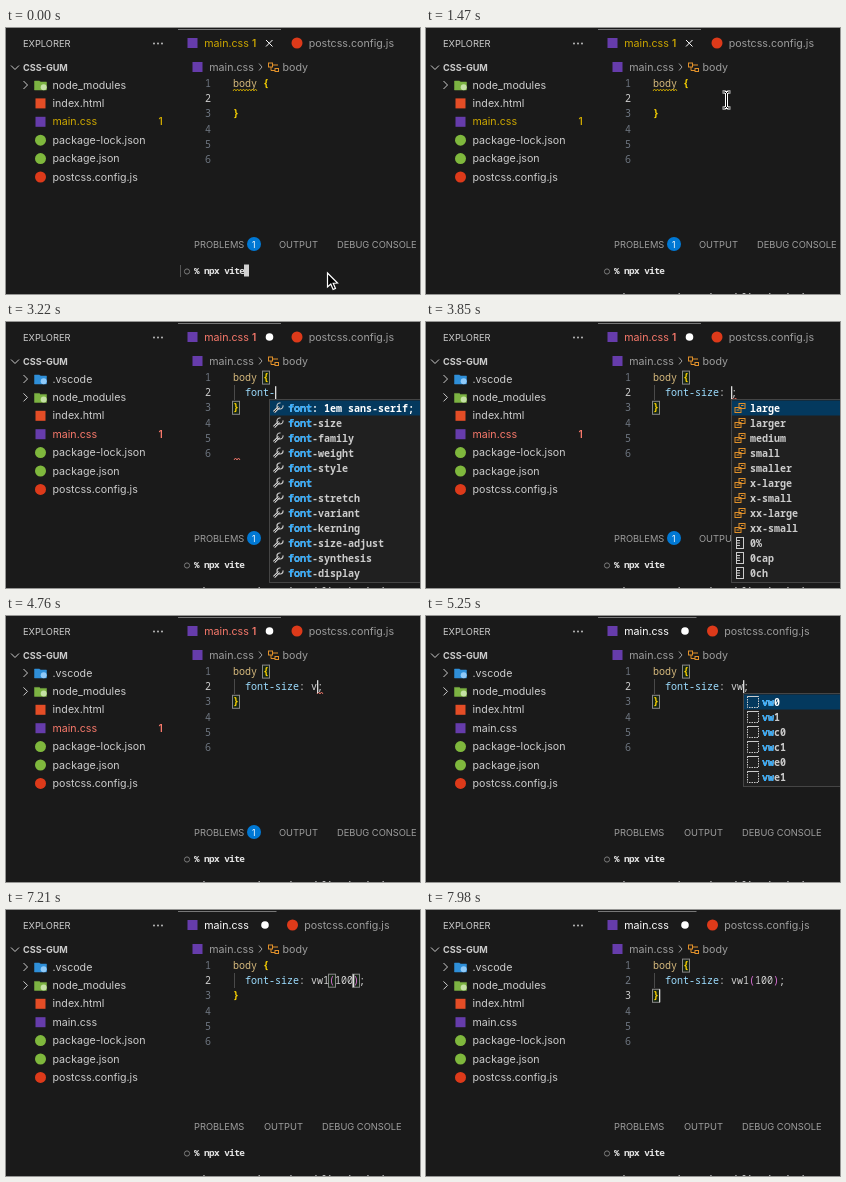
An HTML page with a canvas for the animation above (8000 ms loop, 414 px wide and 266 px high).

```html
<!DOCTYPE html>
<html lang="en">
<head>
<meta charset="utf-8">
<title>Editor typing demo</title>
<style>
html, body { margin: 0; width: 100%; height: 100%; overflow: hidden; background: #1a1a1a; }
canvas { display: block; width: 414px; height: 266px; }
</style>
</head>
<body>
<canvas id="stage"></canvas>
<script>
const W = 414, H = 266, LOOP = 8000;
const canvas = document.getElementById('stage');
const ctx = canvas.getContext('2d');
const dpr = window.devicePixelRatio || 1;
canvas.width = W * dpr;
canvas.height = H * dpr;

const UI = '10.65px Inter, sans-serif';
const CAPS = '9.3px Inter, sans-serif';
const COUNT = '600 10px Inter, sans-serif';
const CODE = '500 10px "Noto Sans Mono", monospace';
const BOLD = '600 10px "Noto Sans Mono", monospace';
const SHELL = '600 9.4px "Noto Sans Mono", monospace';
const CH = 6, LEFT = 227, INDENT = 239;
const C = {
  back: '#1a1a1a', text: '#cccccc', dim: '#9d9d9d', warn: '#cca700', error: '#f8796b',
  css: '#663cab', red: '#dd3a1a', green: '#7fb83d', orange: '#e0902a', gold: '#ffd700', pink: '#da70d6'
};

const PROPS = ['font: 1em sans-serif;', 'font-size', 'font-family', 'font-weight', 'font-style', 'float',
  'flex-direction', 'flex-wrap', 'flex', 'font', 'fill', 'flex-grow', 'font-stretch', 'font-variant',
  'font-kerning', 'font-size-adjust', 'font-synthesis', 'font-display', 'font-palette'];
const VALUES = ['large', 'larger', 'medium', 'small', 'smaller', 'x-large', 'x-small', 'xx-large',
  'xx-small', '0%', '0cap', '0ch'];
const SNIPPETS = ['vw0', 'vw1', 'vwc0', 'vwc1', 'vwe0', 'vwe1'];

// time, text of line 2, caret column, suggestion list, typed prefix
const KEYS = [
  [1820, '', 0],
  [2380, 'f', 1, PROPS, 'f'],
  [2730, 'fo', 2, PROPS, 'fo'],
  [2940, 'fon', 3, PROPS, 'fon'],
  [3080, 'font', 4, PROPS, 'font'],
  [3220, 'font-', 5, PROPS, 'font-'],
  [3360, 'font-s', 6, PROPS, 'font-s'],
  [3570, 'font-size: ;', 11, VALUES, ''],
  [4760, 'font-size: v;', 12, SNIPPETS, 'v'],
  [5040, 'font-size: vw;', 13, SNIPPETS, 'vw'],
  [5950, 'font-size: vw1();', 15],
  [6440, 'font-size: vw1(1);', 16],
  [6580, 'font-size: vw1(10);', 17],
  [6720, 'font-size: vw1(100);', 18],
  [7630, 'font-size: vw1(100);', 18]
];
const keyAt = t => KEYS.filter(k => k[0] <= t).pop();
const lineY = n => 40.5 + 15.1 * n;

function text(str, x, y, color, font = UI, spacing = 0) {
  ctx.font = font;
  ctx.letterSpacing = spacing + 'px';
  ctx.fillStyle = color;
  ctx.fillText(str, x, y + 3.6);
}
function rect(x, y, w, h, color) {
  ctx.fillStyle = color;
  ctx.fillRect(x, y, w, h);
}
function frame(x, y, w, h, color) {
  ctx.strokeStyle = color;
  ctx.lineWidth = 1;
  ctx.strokeRect(x, y, w, h);
}
function disc(x, y, r, color) {
  ctx.fillStyle = color;
  ctx.beginPath();
  ctx.arc(x, y, r, 0, 7);
  ctx.fill();
}
function path(points, color, width = 1, fill) {
  ctx.beginPath();
  for (let i = 0; i < points.length; i += 2) ctx.lineTo(points[i], points[i + 1]);
  if (fill) {
    ctx.closePath();
    ctx.fillStyle = fill;
    ctx.fill();
  }
  ctx.strokeStyle = color;
  ctx.lineWidth = width;
  ctx.stroke();
}
const square = (x, y, color) => rect(x - 5, y - 5, 10, 10, color);
const chevron = (x, y) => path([x - 2, y - 4, x + 2, y, x - 2, y + 4], C.text);

function squiggle(x, y, w, color) {
  const points = [];
  for (let i = 0; i <= w; i += 1.5) points.push(x + i, y + (i % 3 ? -1 : 1));
  path(points, color, 0.9);
}

function folder(x, y, color, badge) {
  path([x - 6, y - 4, x - 1, y - 4, x, y - 3, x + 6, y - 3, x + 6, y + 5, x - 6, y + 5], color, 0.5, color);
  disc(x + 3.2, y + 2.2, 3, badge);
}

function sidebar(t, severity) {
  text('EXPLORER', 17, 15, C.text, CAPS);
  for (const x of [148, 152, 156]) disc(x, 15.5, 0.9, C.text);
  path([5, 37.5, 9, 41.5, 13, 37.5], C.text);
  text('CSS-GUM', 17, 39, C.text, 'bold 9.1px Inter, sans-serif');

  const rows = [
    ['node_modules', (x, y) => folder(x, y, '#7cb342', '#c5e1a5')],
    ['index.html', (x, y) => square(x, y, '#e44d26')],
    ['main.css', (x, y) => square(x, y, C.css)],
    ['package-lock.json', (x, y) => disc(x, y, 5.5, C.green)],
    ['package.json', (x, y) => disc(x, y, 5.5, C.green)],
    ['postcss.config.js', (x, y) => disc(x, y, 5.5, C.red)]
  ];
  if (t >= 1960) rows.unshift(['.vscode', (x, y) => folder(x, y, '#2f8fd8', '#90caf9')]);
  rows.forEach(([name, icon], i) => {
    const y = 57 + 18.4 * i, active = name === 'main.css';
    icon(34.5, y);
    if (/^(\.vs|node)/.test(name)) chevron(19.5, y);
    text(name, 46.5, y, active && severity || C.text);
    if (active && severity) text('1', 152.5, y, severity, COUNT);
  });
}

function tabs(t, severity) {
  const shift = severity ? 0 : -4.5;
  rect(172, 1, 103 + shift, 1, '#777777');
  square(186.5, 15, C.css);
  text('main.css', 198.3, 15, severity || '#ffffff');
  if (severity) text('1', 246, 15, severity, COUNT);
  if (t >= 2380) disc(263.5 + shift, 15, 3.8, '#ffffff');
  else {
    path([260, 12, 266.5, 18.5], '#fff');
    path([266.5, 12, 260, 18.5], '#fff');
  }
  disc(291 + shift, 15, 5.5, C.red);
  text('postcss.config.js', 302.7 + shift, 15, C.dim);

  square(191.5, 39, C.css);
  text('main.css', 203.3, 39, C.dim);
  path([253, 35.5, 256, 39, 253, 42.5], C.dim);
  frame(262.5, 35, 4, 4, C.orange);
  path([267, 37, 272, 37], C.orange);
  path([265, 39, 265, 42.5, 269, 42.5], C.orange);
  frame(269, 40.5, 3.5, 3, C.orange);
  text('body', 276.5, 39, C.dim);
}

function bracketBox(x, y) {
  rect(x, y - 6, CH + 0.5, 12, 'rgba(0,100,0,.15)');
  frame(x - 0.5, y - 6.5, CH + 1, 13, '#888888');
}

function declaration(str) {
  const y = lineY(2);
  const colon = str.indexOf(':');
  [...str].forEach((ch, i) => {
    const inName = colon < 0 || i < colon;
    const color = /[()]/.test(ch) ? C.pink : inName ? '#9cdcfe' : '#d4d4d4';
    text(ch, INDENT + i * CH, y, color, CODE);
  });
}

function editor(t, key) {
  const active = t >= 7630 ? 3 : 2;
  for (let n = 1; n <= 6; n++) text(n, 199, lineY(n), n === active ? '#cccccc' : '#6e7681', CODE);

  const inParens = t >= 5950 && t < 7630;
  if (t >= 1820 && !inParens) {
    bracketBox(257, lineY(1));
    bracketBox(LEFT, lineY(3));
  }
  text('body', LEFT, lineY(1), '#d7ba7d', CODE);
  text('{', 257, lineY(1), C.gold, BOLD);
  text('}', LEFT, lineY(3), C.gold, BOLD);
  if (t < 2450) squiggle(LEFT, 62, 24, C.warn);
  else if (t < 3570) squiggle(228, 137, 7, C.error);
  else if (t >= 3640 && t < 5110) squiggle(INDENT + key[2] * CH, 77, 6, C.error);

  if (!key) return;
  const [time, str, col] = key;
  if (str) rect(228, 63, 1, 15, '#4a4a4a');
  if (inParens) {
    bracketBox(INDENT + str.indexOf('(') * CH, lineY(2));
    bracketBox(INDENT + str.indexOf(')') * CH, lineY(2));
  }
  declaration(str);
  const blinkOn = (t - time) % 1000 < 500;
  if (blinkOn) rect(active === 3 ? LEFT + CH : INDENT + col * CH, lineY(active) - 6.5, 1.3, 13, '#dddddd');
}

function suggestionIcon(list, item, x, y) {
  if (list === PROPS) {
    path([x - 4, y + 4, x + 1, y - 1], C.text, 2.8);
    path([x - 4, y + 4, x + 1, y - 1], '#202020', 0.9);
    ctx.beginPath();
    ctx.arc(x + 2, y - 2, 3, -0.2, 4.9);
    ctx.strokeStyle = C.text;
    ctx.lineWidth = 1.1;
    ctx.stroke();
  } else if (list === SNIPPETS) {
    ctx.setLineDash([1.5, 1]);
    frame(x - 4.5, y - 5.5, 11, 11, C.text);
    ctx.setLineDash([]);
    path([x - 4.5, y - 5.5, x + 6.5, y - 5.5], C.text);
  } else if (/^\d/.test(item)) {
    frame(x - 3.5, y - 5.5, 7, 11, C.text);
    for (const d of [-2.5, 0, 2.5]) path([x - 3, y + d, x, y + d], C.text);
  } else {
    frame(x - 1, y - 4.5, 6, 5, C.orange);
    frame(x - 5, y - 0.5, 6, 5, C.orange);
    path([x + 1, y - 2.5, x + 3.5, y - 2.5], C.orange);
    path([x - 3.5, y + 2, x - 0.5, y + 2], C.orange);
  }
}

// The list follows the typing with a short delay.
function suggestions(t, key) {
  const late = keyAt(t - 120);
  if (!key || !late || !late[3] || late[3] !== key[3]) return;
  const [, , col, list, prefix] = late;
  const left = INDENT + col * CH;
  const items = list.filter(s => s.startsWith(prefix)).slice(0, 12);
  const height = items.length * 15 + 3;
  const selected = list === SNIPPETS && t >= 5530 ? 1 : 0;
  rect(left, 77.5, W, height, '#202020');
  rect(left + 1, 78.5 + selected * 15, W, 15, '#04395e');
  frame(left + 0.5, 77.5, W, height, '#454545');
  items.forEach((item, i) => {
    const y = 86 + 15 * i;
    suggestionIcon(list, item, left + 9, y);
    text(item, left + 19, y, i === selected ? '#ffffff' : C.text, BOLD);
    text(prefix, left + 19, y, '#2aaaff', BOLD);
  });
}

function panel(t, severity) {
  const shift = severity ? 0 : -15;
  text('PROBLEMS', 188, 216, C.dim, CAPS);
  if (severity) {
    disc(248, 216, 7, '#0078d4');
    text('1', 246, 216, '#ffffff', '8.5px Inter, sans-serif');
  }
  text('OUTPUT', 273 + shift, 216, C.dim, CAPS);
  text('DEBUG CONSOLE', 331 + shift, 216, C.dim, CAPS);

  ctx.beginPath();
  ctx.arc(181, 243.5, 2.6, 0, 7);
  ctx.strokeStyle = '#7a7a7a';
  ctx.lineWidth = 1;
  ctx.stroke();
  text('% npx vite', 188, 242.5, '#e6e6e6', SHELL, -0.6);
  if (t < 280) {
    rect(174, 237, 1, 12, '#555555');
    rect(238, 236.5, 5, 12, '#d0d0d0');
  } else if (t < 700) rect(188, 250, 5, 12, '#d0d0d0');
  else text('vite v7.1.4 is ready and live in the browser', 190, 268, '#b8b8b8', SHELL, -0.6);
}

function pointer(t) {
  if (t >= 2380) return;
  const p = Math.min(1, Math.max(0, (t - 1050) / 420));
  const e = p * p * (3 - 2 * p);
  const x = 321.5 - 21 * e, y = 245 - 173 * e;
  if (y > 201) {
    const arrow = [0, 0, 0, 14, 3.3, 11, 5.6, 16.5, 8, 15.4, 5.7, 10.2, 10, 10];
    path(arrow.concat(0, 0).map((v, i) => v + (i % 2 ? y : x)), '#ffffff', 1.2, '#000000');
    return;
  }
  for (const [color, width] of [['#ffffff', 3], ['#000000', 1]]) {
    path([x, y - 7, x, y + 7], color, width);
    path([x - 4, y - 8, x - 1.5, y - 8, x, y - 6.5, x + 1.5, y - 8, x + 4, y - 8], color, width);
    path([x - 4, y + 8, x - 1.5, y + 8, x, y + 6.5, x + 1.5, y + 8, x + 4, y + 8], color, width);
  }
}

function draw(t) {
  const key = keyAt(t);
  const severity = t < 2940 ? C.warn : t < 5180 ? C.error : null;
  ctx.setTransform(dpr, 0, 0, dpr, 0, 0);
  rect(0, 0, W, H, C.back);
  sidebar(t, severity);
  tabs(t, severity);
  editor(t, key);
  panel(t, severity);
  suggestions(t, key);
  pointer(t);
}

function tick() {
  draw(performance.now() % LOOP);
  requestAnimationFrame(tick);
}
tick();
</script>
</body>
</html>
```
